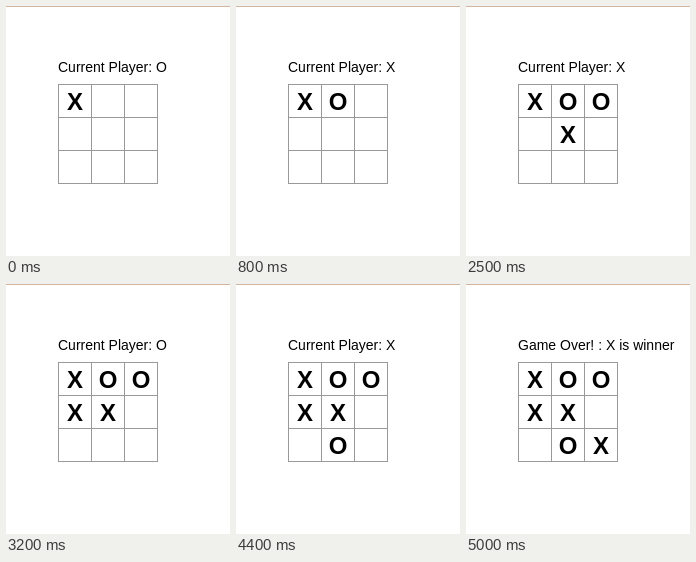
Write an HTML page that moves like this. It is 224 px wide and 250 px high and loops after 6400 ms.

```html
<!DOCTYPE html>
<html lang="en">
<head>
<meta charset="utf-8">
<title>Tic-tac-toe</title>
<style>
  html, body { margin: 0; height: 100%; overflow: hidden; background: #fff; }
  svg { display: block; font: 14px "Liberation Sans", Arial, sans-serif; }
  .mark { font-size: 24px; font-weight: bold; text-anchor: middle; }
</style>
</head>
<body>
<svg width="224" height="250" viewBox="0 0 224 250">
  <rect width="224" height="1" fill="#d3b49c"/>
  <path d="M52 78.5h100m-100 33h100m-100 33h100m-100 33h100M52.5 78v100m33-100v100m33-100v100m33-100v100" fill="none" stroke="#999"/>
  <text id="status" x="52" y="66"></text>
</svg>
<script>
const LOOP = 6400, CELL = 33;
// [time in ms, cell index]; players alternate, X first
const moves = [[0, 0], [600, 1], [1400, 4], [2500, 2], [3200, 3], [4400, 7], [4900, 8]];
const svg = document.querySelector("svg");
const status = document.getElementById("status");
const player = i => "XO"[i % 2];

const marks = moves.map(([, cell], i) => {
  const mark = document.createElementNS(svg.namespaceURI, "text");
  mark.setAttribute("class", "mark");
  mark.setAttribute("x", 69 + cell % 3 * CELL);
  mark.setAttribute("y", 104 + Math.floor(cell / 3) * CELL);
  mark.textContent = player(i);
  return svg.appendChild(mark);
});

const start = performance.now();
function draw() {
  const t = (performance.now() - start) % LOOP;
  const played = moves.filter(([time]) => time <= t).length;
  marks.forEach((mark, i) => mark.setAttribute("visibility", i < played ? "visible" : "hidden"));
  status.textContent = played === moves.length
    ? "Game Over! : X is winner"
    : "Current Player: " + player(played);
  requestAnimationFrame(draw);
}
draw();
</script>
</body>
</html>
```
